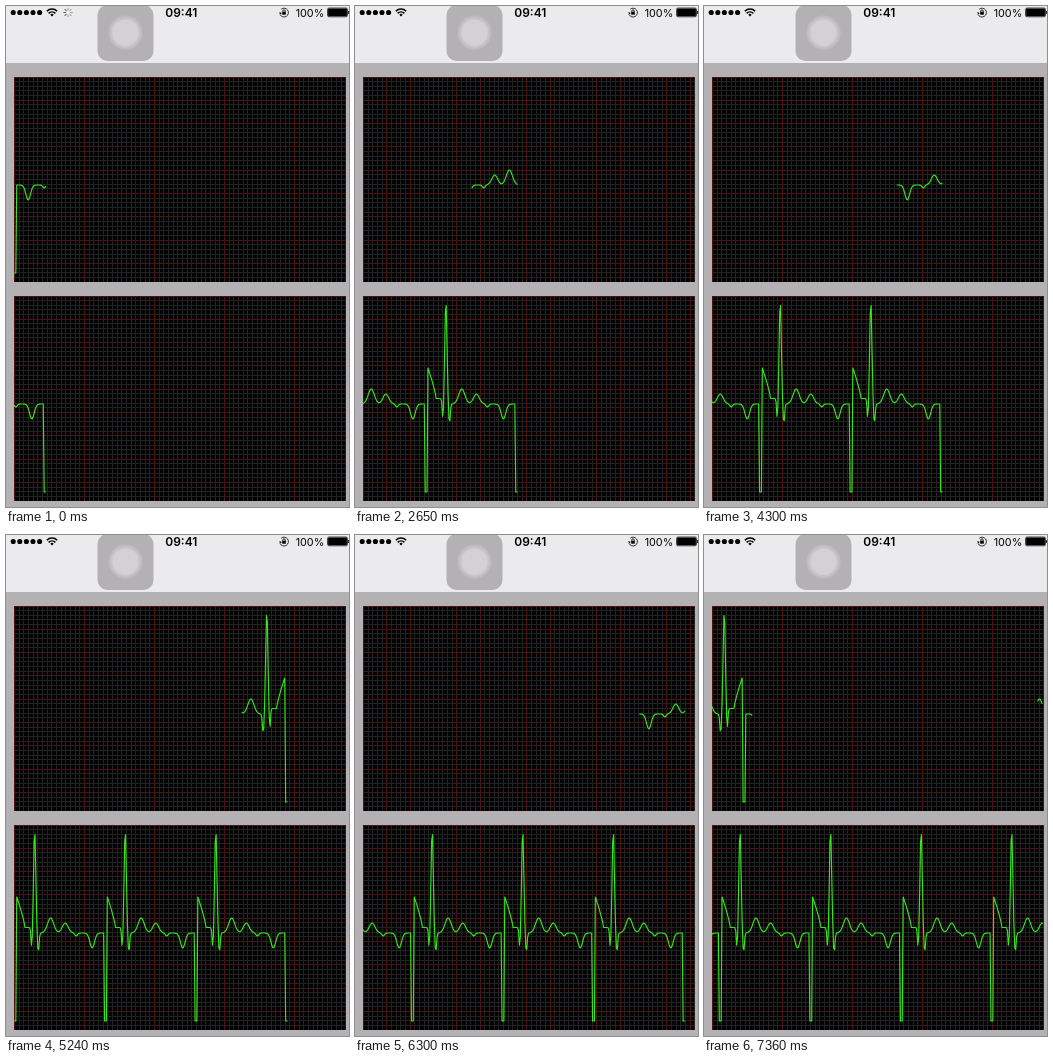
These frames come from a looping animation (343x501 px, 7380 ms). An HTML page:

```html
<!DOCTYPE html>
<html lang="en">
<head>
<meta charset="utf-8">
<title>Heart monitor</title>
<style>
  html, body { margin: 0; width: 100%; height: 100%; overflow: hidden; background: #b3b1b3; }
  svg { display: block; }
  text { font-family: Inter, Roboto, sans-serif; fill: #000; }
  .trace { fill: none; stroke: #35e61c; stroke-width: 1.15; stroke-linejoin: round; }
</style>
</head>
<body>
<svg width="343" height="501" viewBox="0 0 343 501">
  <defs>
    <clipPath id="panels">
      <rect x="8" y="71" width="332" height="205"/>
      <rect x="8" y="290" width="332" height="205"/>
    </clipPath>
  </defs>
  <rect width="343" height="501" fill="#b3b1b3"/>
  <rect width="343" height="57" fill="#ebeaec"/>

  <g id="dots"></g>
  <g fill="none" stroke="#000" stroke-width="1.6">
    <path d="M40.8 5.2a7.4 7.4 0 0 1 10.4 0M42.6 7.3a4.9 4.9 0 0 1 6.8 0"/>
    <path d="M44.3 8.7L46 10.5L47.7 8.7A2.4 2.4 0 0 0 44.3 8.7Z" fill="#000" stroke="none"/>
  </g>
  <g id="spinner" stroke-width="1" stroke-linecap="round"></g>
  <text x="175.3" y="10.7" font-size="12" font-weight="600" text-anchor="middle">09:41</text>
  <g fill="none" stroke="#000" stroke-width="0.8">
    <path d="M275.2 3.2A4.4 4.4 0 1 1 274 8.4"/>
    <path d="M276.8 6V5a1.2 1.2 0 0 1 2.4 0V6"/>
    <path d="M273.4 5.9l0.5 2.5l2-1.5z" fill="#000" stroke="none"/>
    <rect x="276.2" y="5.8" width="3.6" height="2.9" fill="#000" stroke="none"/>
  </g>
  <text x="318.3" y="10.5" font-size="10.8" text-anchor="end">100%</text>
  <rect x="321.5" y="2" width="20" height="8.8" rx="1.6" fill="none" stroke="#000" stroke-width="0.7"/>
  <rect x="322.1" y="2.6" width="18.8" height="7.6" rx="0.8"/>
  <path d="M342.2 5h0.8v3h-0.8z"/>

  <rect x="91.5" y="-1" width="56" height="56" rx="10" fill="#b3b1b3"/>
  <circle cx="119.5" cy="26.7" r="17.2" fill="#bdbbbd"/>
  <circle cx="119.5" cy="26.7" r="15.4" fill="#c6c4c6"/>
  <circle cx="119.5" cy="26.7" r="13.2" fill="#d3d1d3"/>

  <g clip-path="url(#panels)">
    <g id="grid"></g>
    <path id="sweep" class="trace"/>
    <path id="scroll" class="trace"/>
  </g>
</svg>
<script>
const LOOP = 7380, HOLD = 290, STEP = 117.83; // ms
const LEFT = 8, WIDTH = 332, PANEL_H = 205, TOP_Y = 71, BOTTOM_Y = 290;
const DX = 0.9147, PERIOD = 99, TAIL = 50, SPAN = 362; // px per sample, then samples
const START = 35.45, RATE = 0.0503; // samples, samples per ms

// Bumps of one heartbeat: centre, width, height (positive is down)
const BUMPS = [
  [15.5, 3.6, 15], [33, 2, 3], [45, 4.5, -10], [61, 4.8, -15],
  [74.5, 1.2, 20], [78.4, 1.7, -104], [81.5, 1.2, 16]
];

// Height of the wave in the upper panel
function beatY(sample) {
  const n = sample % PERIOD;
  if (n <= 2) return 267;
  let y = 179;
  for (const [center, width, height] of BUMPS) y += height * Math.exp(-(((n - center) / width) ** 2));
  if (n > 82) y -= 5.5;
  if (n > 89) y -= 30.5 * ((n - 89) / 9) ** 0.8;
  return y;
}

const $ = id => document.getElementById(id);
function add(parent, tag, attrs) {
  const el = document.createElementNS("http://www.w3.org/2000/svg", tag);
  for (const k in attrs) el.setAttribute(k, attrs[k]);
  $(parent).append(el);
}

function drawStatus() {
  for (let i = 0; i < 5; i++) add("dots", "circle", { cx: 7.2 + i * 6.6, cy: 6.5, r: 2.55 });
  for (let i = 0; i < 8; i++) {
    add("spinner", "path", {
      d: "M62 4V2.2", transform: `rotate(${i * 45} 62 6.5)`,
      stroke: i > 4 ? "#555" : "#999"
    });
  }
}

function drawGrid(top) {
  const cell = 4.665;
  add("grid", "rect", { x: LEFT, y: top, width: WIDTH, height: PANEL_H, fill: "#030304" });
  for (const major of [false, true]) {
    let d = "";
    for (let i = 0; i * cell < WIDTH; i++) {
      if ((i % 5 === 0) !== major) continue;
      const x = Math.floor(LEFT + 0.5 + i * cell) + 0.5;
      const y = Math.floor(top + i * cell) + 0.5;
      d += `M${x} ${top}v${PANEL_H}`;
      if (y < top + PANEL_H) d += `M${LEFT} ${y}h${WIDTH}`;
    }
    add("grid", "path", { d, stroke: major ? "#4c1311" : "#222224" });
  }
}

const path = points => "M" + points.map(([x, y]) => `${x.toFixed(2)} ${y.toFixed(1)}`).join("L");

// Upper trace: a short tail that runs across the panel and wraps around
function sweepPath(head) {
  const runs = {};
  for (let i = Math.max(0, head - TAIL); i <= head; i++) {
    const lap = Math.floor(i / SPAN);
    (runs[lap] ??= []).push([LEFT + (i % SPAN) * DX, beatY(i)]);
  }
  return Object.values(runs).map(path).join("");
}

// Lower trace: new samples enter on the left and push the rest to the right
function scrollPath(head) {
  const points = [];
  for (let k = 0; k <= Math.min(head, SPAN); k++) {
    points.push([LEFT + k * DX, beatY(head - k) + BOTTOM_Y - TOP_Y]);
  }
  return path(points);
}

function render(t) {
  const now = t < HOLD ? 0 : HOLD + Math.floor((t - HOLD) / STEP) * STEP;
  const head = Math.round(START + RATE * now);
  $("sweep").setAttribute("d", sweepPath(head));
  $("scroll").setAttribute("d", scrollPath(head));
  $("spinner").style.display = now ? "none" : "";
}

drawStatus();
drawGrid(TOP_Y);
drawGrid(BOTTOM_Y);
const begin = performance.now();
function tick() {
  render((performance.now() - begin) % LOOP);
  requestAnimationFrame(tick);
}
tick();
</script>
</body>
</html>
```
